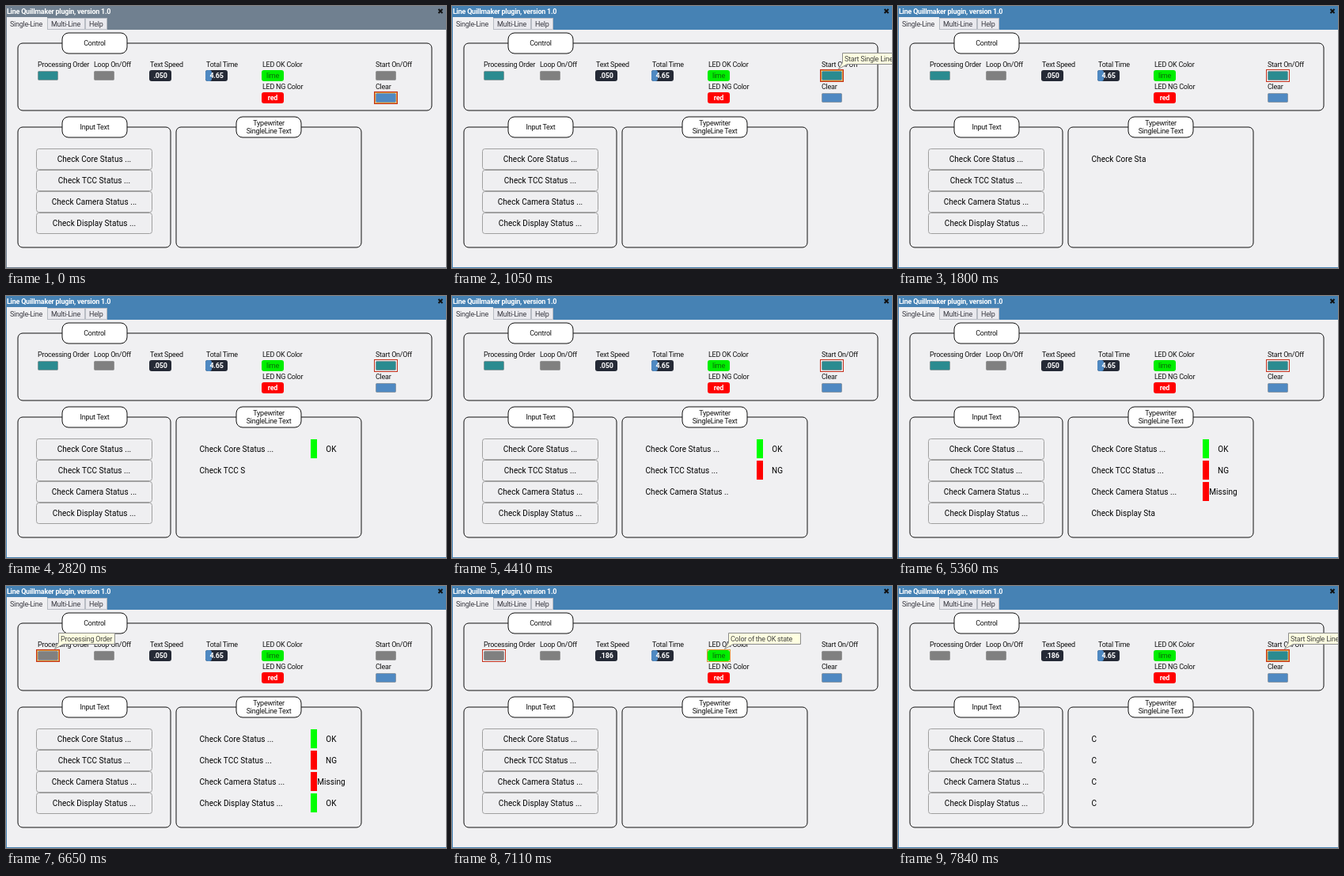
Animation of 556x331 px, one loop 8 s. Source, as an HTML page:

```html
<!DOCTYPE html>
<html lang="en">
<head>
<meta charset="utf-8">
<title>Single-line text panel</title>
<style>
  html, body { margin: 0; width: 100%; height: 100%; overflow: hidden; background: #f0f0f2; }
  svg { display: block; width: 556px; height: 331px; }
  text { font: 9px Roboto, sans-serif; letter-spacing: -.25px; fill: #111; white-space: pre; }
  .bold { font-weight: 700; }
  .white { fill: #fff; }
  .lime { fill: #0b6b0b; }
  .tab { fill: #3c3c44; }
  .mid { text-anchor: middle; }
  .row { font-size: 10px; letter-spacing: .06px; fill: #000; }
  .frame { fill: none; stroke: #111; }
  .pill { fill: #fff; stroke: #111; }
  .key { fill: #efeff1; stroke: #a0a0a0; }
  .ring { fill: none; }
  .tip path { fill: #ffffe1; stroke: #8c8c8c; }
  .tip text { fill: #444; }
</style>
</head>
<body>
<svg id="stage" viewBox="0 0 556 331"></svg>
<script>
const LOOP = 8000;
const TEAL = '#2a8b90', GRAY = '#808080', BLUE = '#4f89c2';
const LIME = '#00ff00', RED = '#ff0000';
const HOVER = '#dd9a38', FOCUS = '#c4301c';
const stage = document.getElementById('stage');

function add(tag, attrs, parent = stage) {
  const el = document.createElementNS('http://www.w3.org/2000/svg', tag);
  for (const k in attrs) el.setAttribute(k, attrs[k]);
  parent.appendChild(el);
  return el;
}
const box = (x, y, width, height, more = {}, parent) =>
  add('rect', { x, y, width, height, ...more }, parent);
function label(x, y, str, cls = '', parent) {
  const el = add('text', { x, y, class: cls }, parent);
  el.textContent = str;
  return el;
}
const show = (el, on) => el.setAttribute('visibility', on ? 'visible' : 'hidden');
const fill = (el, color) => el.setAttribute('fill', color);
const during = (t, from, to) => t >= from && t < to;

// Window: its colour shows in the title, the tab strip and the edges
const backdrop = box(0, 0, 556, 331);
box(1, 30, 555, 300, { fill: '#f0f0f2' });
label(1, 10, 'Line Quillmaker plugin, version 1.0', 'bold white');
add('path', { d: 'M546.5 4l5 5M551.5 4l-5 5', stroke: '#111', 'stroke-width': 2 });

// Tabs
box(1, 14, 51, 16, { fill: '#f0f0f2' });
for (const [x, w] of [[52.5, 47], [100.5, 27]])
  box(x, 15.5, w, 14, { fill: '#e9e9ee', stroke: '#b8bcc4' });
label(5, 26, 'Single-Line', 'tab');
label(57, 26, 'Multi-Line', 'tab');
label(105, 26, 'Help', 'tab');

// Panels
function panel(x, y, w, h, pillX, lines) {
  box(x, y, w, h, { rx: 6, class: 'frame' });
  box(pillX, y - 13, 82, 26, { rx: 8, class: 'pill' });
  const top = y + 3 - (lines.length - 1) * 5.5;
  lines.forEach((s, i) => label(pillX + 41, top + i * 10, s, 'mid'));
}
panel(15, 47, 523, 85, 71, ['Control']);
panel(215, 153, 234, 152, 291, ['Typewriter', 'SingleLine Text']);
panel(15, 153, 193, 152, 71, ['Input Text']);

// Control row
function button(x, y, name) {
  label(x, y - 5, name);
  const face = box(x + .5, y + .5, 25, 11, { rx: 1, stroke: '#777', 'stroke-opacity': .5 });
  const inner = box(x - .5, y - .5, 27, 13, { class: 'ring', stroke: HOVER });
  const outer = box(x - 1.5, y - 1.5, 29, 15, { class: 'ring', stroke: FOCUS });
  return (color, hover, focus) => {
    fill(face, color);
    show(inner, hover);
    show(outer, focus);
  };
}
const order = button(40, 82, 'Processing Order');
const repeat = button(111, 82, 'Loop On/Off');
const start = button(467, 82, 'Start On/Off');
const clear = button(467, 110, 'Clear');

function field(x, y, name, value, color, cls) {
  label(x + 1, y - 4, name);
  box(x, y, 28, 14, { rx: 3, fill: color });
  if (name === 'Total Time') box(x, y, 8, 14, { rx: 3, fill: BLUE });
  return label(x + 14, y + 10, value, 'mid ' + cls);
}
const speed = field(181, 81, 'Text Speed', '.050', '#252a36', 'bold white');
field(252, 81, 'Total Time', '4.65', '#252a36', 'bold white');
field(323, 81, 'LED OK Color', 'lime', '#00ee00', 'lime');
field(323, 109, 'LED NG Color', 'red', RED, 'bold white');
const okRing = box(322.5, 80.5, 29, 15, { class: 'ring', stroke: HOVER });

// Rows: typing is given as [time, visible letters]
const rows = [
  { text: 'Check Core Status ...', end: 2620, result: 'OK',
    steps: [[1120, 1], [1260, 3], [1330, 4], [1400, 5], [1470, 7], [1540, 8],
            [1600, 10], [1800, 14], [1870, 16], [2070, 17], [2270, 21]] },
  { text: 'Check TCC Status ...', end: 3290, result: 'NG',
    steps: [[2620, 7], [2690, 8], [2820, 11], [2890, 12], [2960, 14],
            [3160, 18], [3230, 19], [3290, 20]] },
  { text: 'Check Camera Status ...', end: 4480, result: 'Missing',
    steps: [[3290, 1], [3750, 9], [3820, 11], [3890, 12], [3950, 14], [4020, 15],
            [4090, 16], [4210, 18], [4280, 20], [4410, 22], [4480, 23]] },
  { text: 'Check Display Status ...', end: 5770, result: 'OK',
    steps: [[4480, 1], [4810, 7], [4880, 8], [4950, 9], [5020, 11], [5090, 12],
            [5150, 13], [5220, 14], [5360, 17], [5580, 21], [5640, 22], [5710, 24]] }
];
rows.forEach((row, i) => {
  const y = 180 + 27 * i;
  box(38.5, y + .5, 146, 26, { rx: 3, class: 'key' });
  label(111.5, y + 17, row.text, 'row mid');
  row.out = label(244.5, y + 17, '', 'row');
  row.led = add('g', {});
  box(385, y + 1, 8, 24, { fill: row.result === 'OK' ? LIME : RED }, row.led);
  label(411, y + 17, row.result, 'row mid', row.led);
});

function letters(row, t) {
  if (t >= 7840) return 1;
  if (t >= 6720) return 0;
  let n = 0;
  for (const [at, count] of row.steps) if (t >= at) n = count;
  return n;
}

// Tooltips: a box with a tail at its lower left corner
function tip(x, width, str) {
  const g = add('g', { class: 'tip' });
  add('path', { d: `M${x + .5} 59.5h${width}v14h${6 - width}l-11 6l5 -8z` }, g);
  label(x + 3, 70, str, '', g);
  return g;
}
const startTip = tip(493, 90, 'Start Single Line Text');
const orderTip = tip(66, 71, 'Processing Order');
const repeatTip = tip(137, 54, 'Loop On/Off');
const okTip = tip(349, 91, 'Color of the OK state');

function draw(t) {
  const active = t >= 1050;
  const overStart = during(t, 390, 1540) || t >= 7440;
  const overOrder = during(t, 5580, 6920);
  const overRepeat = during(t, 5150, 5360);
  const overOk = during(t, 7110, 7180);
  const running = during(t, 1050, 5770) || t >= 7770;

  fill(backdrop, active ? '#4682b4' : '#708090');
  start(running ? TEAL : GRAY, overStart, during(t, 1050, 6650) || t >= 7770);
  order(t < 6650 ? TEAL : GRAY, overOrder, during(t, 6650, 7770));
  repeat(GRAY, overRepeat, false);
  clear(BLUE, t < 390, !active);

  speed.textContent = t < 6720 ? '.050' : '.186';
  for (const row of rows) {
    row.out.textContent = row.text.slice(0, letters(row, t));
    show(row.led, during(t, row.end, 6720));
  }
  show(startTip, overStart);
  show(orderTip, overOrder);
  show(repeatTip, overRepeat);
  show(okTip, overOk);
  show(okRing, overOk);
}

const began = performance.now();
function tick() {
  draw((performance.now() - began) % LOOP);
  requestAnimationFrame(tick);
}
tick();
</script>
</body>
</html>
```
